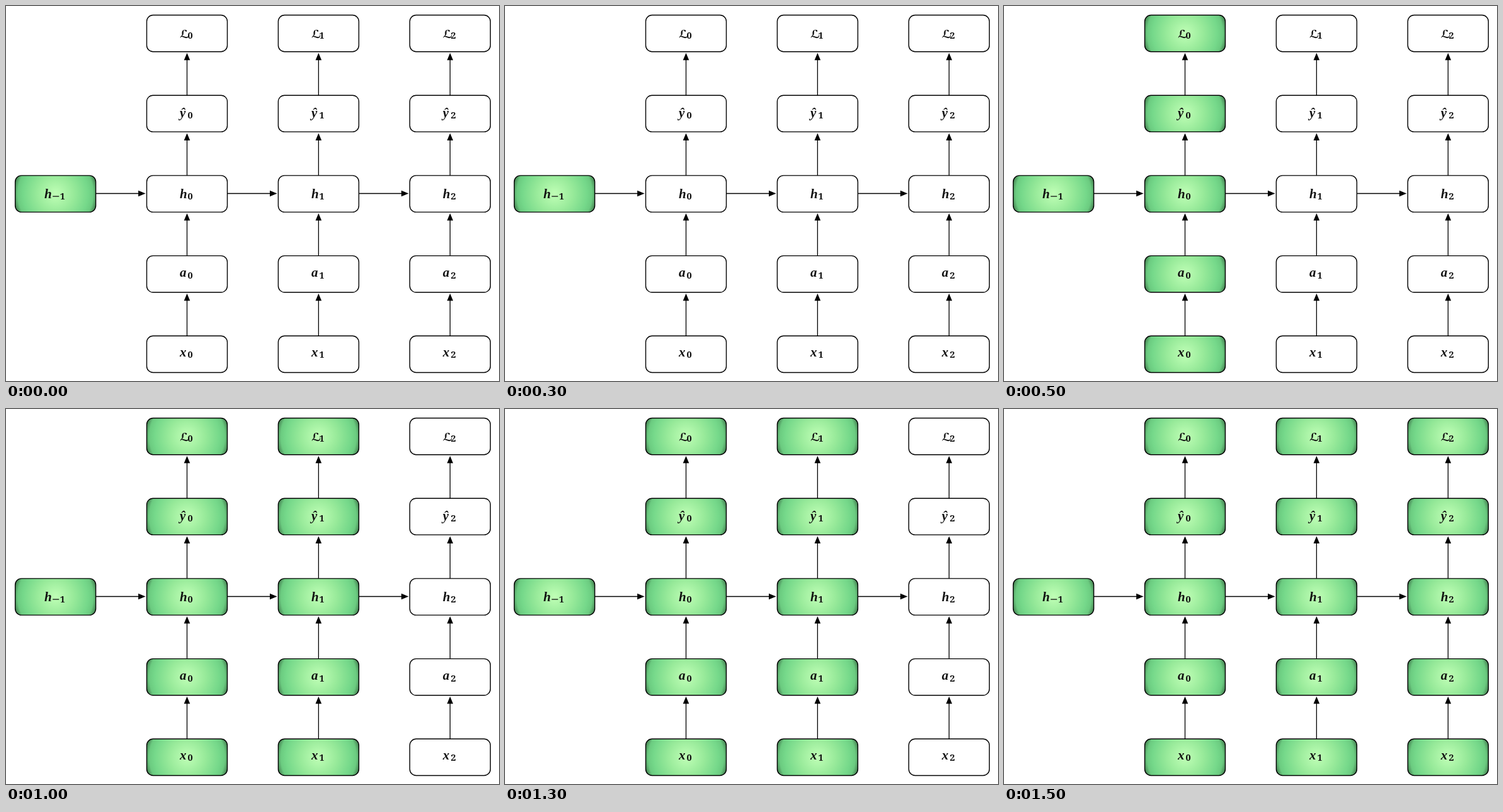
An HTML page with a canvas for the animation above (2 s loop, 783 by 597 pixels).

```html
<!DOCTYPE html>
<html>
<head>
<meta charset="utf-8">
<style>
html, body { margin: 0; width: 100%; height: 100%; overflow: hidden; background: #fff; }
canvas { display: block; }
</style>
</head>
<body>
<canvas id="stage" width="783" height="597"></canvas>
<script>
const ctx = document.getElementById('stage').getContext('2d');
const STEP = 500, STEPS = 4;
const BOX_W = 128, BOX_H = 58.2;
const colX = col => 78.6 + col * 208.9;
const rowY = row => 43.6 + row * 127.7;

// Letter, baseline and subscript baseline relative to the box centre
const rows = [
  { letter: 'ℒ', base: 7, sub: 8.2, font: 'bold 18px "DejaVu Sans", sans-serif' },
  { letter: 'ŷ', base: 6, sub: 8 },
  { letter: 'h', base: 7, sub: 8.6 },
  { letter: 'a', base: 4.6, sub: 6.8 },
  { letter: 'x', base: 3.4, sub: 5.4 }
];
const HIDDEN_ROW = 2;
const MATH_FONT = 'italic bold 21px "Liberation Serif", serif';
const SUB_FONT = '600 14.5px "Noto Serif", serif';
const SHADES = [[0, '#c0ffb6'], [0.42, '#98ea9a'], [0.75, '#75d88a'],
                [0.87, '#6bcb80'], [0.93, '#559f65'], [1, '#37683f']];

function drawBox(col, row, lit) {
  const x = colX(col), y = rowY(row);
  ctx.beginPath();
  ctx.roundRect(x - BOX_W / 2, y - BOX_H / 2, BOX_W, BOX_H, 10);
  if (lit) {
    const glow = ctx.createRadialGradient(x, y, 0, x, y, 69);
    SHADES.forEach(([at, colour]) => glow.addColorStop(at, colour));
    ctx.fillStyle = glow;
  } else {
    ctx.fillStyle = '#fff';
  }
  ctx.fill();
  ctx.lineWidth = 1.4;
  ctx.stroke();
  drawLabel(x, y, rows[row], col - 1);
}

function drawLabel(x, y, { letter, base, sub, font = MATH_FONT }, index) {
  const left = x - (index < 0 ? 17.5 : 11.5);
  ctx.fillStyle = '#111';
  ctx.font = font;
  ctx.fillText(letter, left, y + base);
  ctx.font = SUB_FONT;
  let subX = left + 12.6;
  if (index < 0) {
    ctx.fillRect(subX + 0.5, y + sub - 5.2, 10, 1.3);
    subX += 12;
  }
  ctx.fillText(Math.abs(index), subX, y + sub);
}

function drawArrow(x, y, length, angle) {
  ctx.save();
  ctx.translate(x, y);
  ctx.rotate(angle);
  ctx.lineWidth = 1.3;
  ctx.beginPath();
  ctx.moveTo(0, 0);
  ctx.lineTo(length - 8, 0);
  ctx.stroke();
  ctx.beginPath();
  ctx.moveTo(length, 0);
  ctx.lineTo(length - 11.5, -4.8);
  ctx.lineTo(length - 11.5, 4.8);
  ctx.fillStyle = '#000';
  ctx.fill();
  ctx.restore();
}

function draw(now) {
  const step = Math.floor(now / STEP) % STEPS;
  ctx.fillStyle = '#fff';
  ctx.fillRect(0, 0, 783, 597);
  ctx.strokeStyle = '#000';
  for (let col = 0; col < 4; col++) {
    rows.forEach((_, row) => {
      if (col === 0 && row !== HIDDEN_ROW) return;
      drawBox(col, row, col <= step);
      if (col > 0 && row > 0) drawArrow(colX(col), rowY(row) - BOX_H / 2, 67.5, -Math.PI / 2);
    });
    if (col < 3) drawArrow(colX(col) + BOX_W / 2, rowY(HIDDEN_ROW) - 0.5, 79, 0);
  }
}

const start = performance.now();
function tick() {
  draw(performance.now() - start);
  requestAnimationFrame(tick);
}
tick();
</script>
</body>
</html>
```
